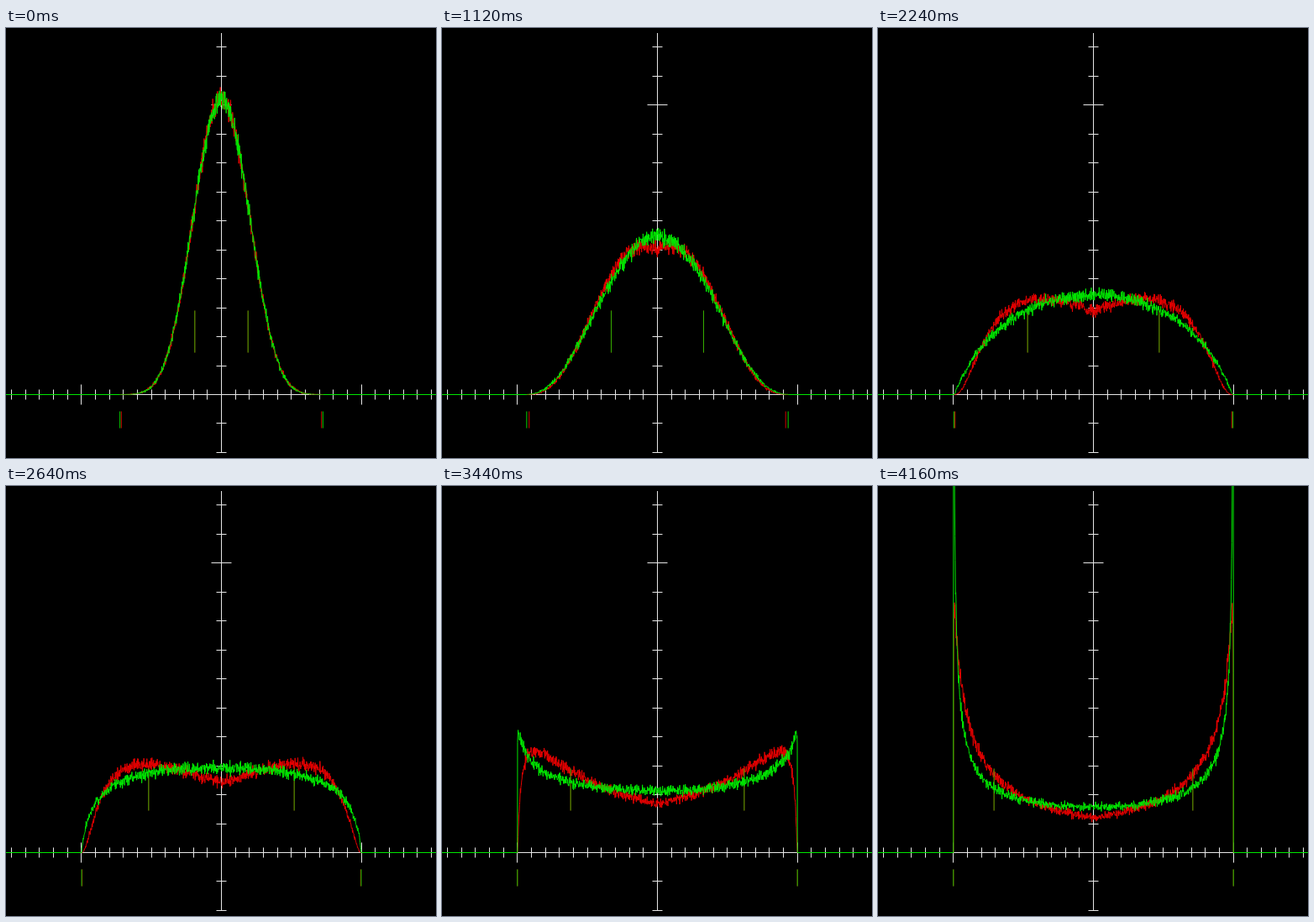
An HTML page with a canvas that plays this animation: 512 px wide and 512 px high, repeating every 4.24 s.

```html
<!DOCTYPE html>
<html lang="en">
<head>
<meta charset="utf-8">
<title>Two distributions of equal deviation</title>
<style>
html, body { margin: 0; width: 100%; height: 100%; overflow: hidden; background: #000; }
canvas { display: block; width: 512px; height: 512px; }
</style>
</head>
<body>
<canvas id="stage" width="512" height="512"></canvas>
<script>
const ctx = document.getElementById("stage").getContext("2d");
const STEP_MS = 80, STEPS = 53;
const CX = 256, CY = 436, UNIT = 166.7, TICK = 34.49;
const DENSITY = 172.5; // pixel height of density 1
const BIN = 0.002, NOISE = 0.36;

// Values at these steps are joined by straight lines.
const KEYS = [0, 8, 19, 28, 37, 48, 52];
const RED = {
  color: "#e60000", seed: 11,
  edge: [0, 0.6, 0.4, 0.47, 0.24, 0.105, 0.08],
  vee: [0, 0.65, 0.65, 0.65, 0.65, 0.65, 0.65],
  reach: [0.715, 0.863, 0.96, 0.989, 1, 1, 1]
};
const GREEN = {
  color: "#00e600", seed: 47,
  edge: [1, 0.5, 0.2, 0.1, 0.07, 0, 0],
  vee: [0, 0, 0, 0, 0, 0, 0],
  reach: [0.725, 0.881, 0.978, 0.996, 1, 1, 1]
};

function at(values, step) {
  let i = 0;
  while (i < KEYS.length - 2 && step >= KEYS[i + 1]) i++;
  const p = (step - KEYS[i]) / (KEYS[i + 1] - KEYS[i]);
  return values[i] + (values[i + 1] - values[i]) * p;
}

function random(seed) {
  return () => {
    seed = (seed + 0x6D2B79F5) | 0;
    let v = Math.imul(seed ^ (seed >>> 15), seed | 1);
    v ^= v + Math.imul(v ^ (v >>> 7), v | 61);
    return ((v ^ (v >>> 14)) >>> 0) / 4294967296;
  };
}

// Density on (-1, 1) whose power is solved to give the wanted deviation.
function density(sigma, edge, vee) {
  const shape = (x, power) => {
    const l = Math.log(1 - x * x);
    return (1 + vee * Math.abs(x)) * Math.exp(power * l - edge * l * l);
  };
  const moments = power => {
    const n = 400;
    let area = 0, square = 0;
    for (let i = 0; i < n; i++) {
      const a = (i + 0.5) / n * Math.PI / 2, x = Math.sin(a);
      const w = shape(x, power) * Math.cos(a) * Math.PI / 2 / n;
      area += w;
      square += w * x * x;
    }
    return { area, variance: square / area };
  };
  let low = -1.5, high = 30;
  for (let i = 0; i < 30; i++) {
    const mid = (low + high) / 2;
    if (moments(mid).variance > sigma * sigma) low = mid; else high = mid;
  }
  const area = 2 * moments(high).area;
  return x => shape(x, high) / area;
}

const px = x => CX + 0.5 + x * UNIT;

function axes() {
  ctx.fillStyle = "#e6e6e6";
  ctx.fillRect(0, CY, 512, 1);
  ctx.fillRect(CX, 6, 1, 500);
  for (let i = -15; i <= 15; i++) {
    const r = i && i % 10 === 0 ? 12 : 6;
    ctx.fillRect(Math.round(CX + i * UNIT / 10), CY + 0.5 - r, 1, 2 * r);
  }
  for (let i = -2; i <= 12; i++) {
    const r = i === 10 ? 12 : 6;
    ctx.fillRect(CX + 0.5 - r, Math.round(CY - i * TICK), 2 * r, 1);
  }
}

function curve(set, step, sigma) {
  const f = density(sigma, at(set.edge, step), at(set.vee, step));
  const rand = random(set.seed + step * 977);
  const reach = at(set.reach, step), base = CY + 0.5;
  ctx.beginPath();
  ctx.moveTo(0, base);
  ctx.lineTo(px(-reach), base);
  for (let x = -reach + BIN / 2; x < reach; x += BIN) {
    const h = DENSITY * f(x);
    const noise = (rand() + rand() + rand() - 1.5) * 2;
    ctx.lineTo(px(x), base - Math.max(0, h + NOISE * Math.sqrt(h) * noise));
  }
  ctx.lineTo(px(reach), base);
  ctx.lineTo(512, base);
  ctx.strokeStyle = set.color;
  ctx.stroke();
}

function marks(set, offset, top, bottom, alpha) {
  ctx.globalAlpha = alpha;
  ctx.strokeStyle = set.color;
  ctx.beginPath();
  for (const side of [-1, 1]) {
    ctx.moveTo(px(side * offset), top);
    ctx.lineTo(px(side * offset), bottom);
  }
  ctx.stroke();
  ctx.globalAlpha = 1;
}

function draw(step) {
  const sigma = 0.19 + 0.01 * step;
  ctx.fillStyle = "#000";
  ctx.fillRect(0, 0, 512, 512);
  ctx.lineWidth = 1;
  ctx.lineJoin = "bevel";
  axes();
  for (const set of [RED, GREEN]) {
    curve(set, step, sigma);
    marks(set, sigma, 336.5, 386.5, set === RED ? 0.9 : 0.75);
    marks(set, at(set.reach, step), 456.5, 476.5, 0.9);
  }
}

let shown = -1;
const start = performance.now();
function tick() {
  const step = Math.floor((performance.now() - start) / STEP_MS) % STEPS;
  if (step !== shown) draw(shown = step);
  requestAnimationFrame(tick);
}
tick();
</script>
</body>
</html>
```
